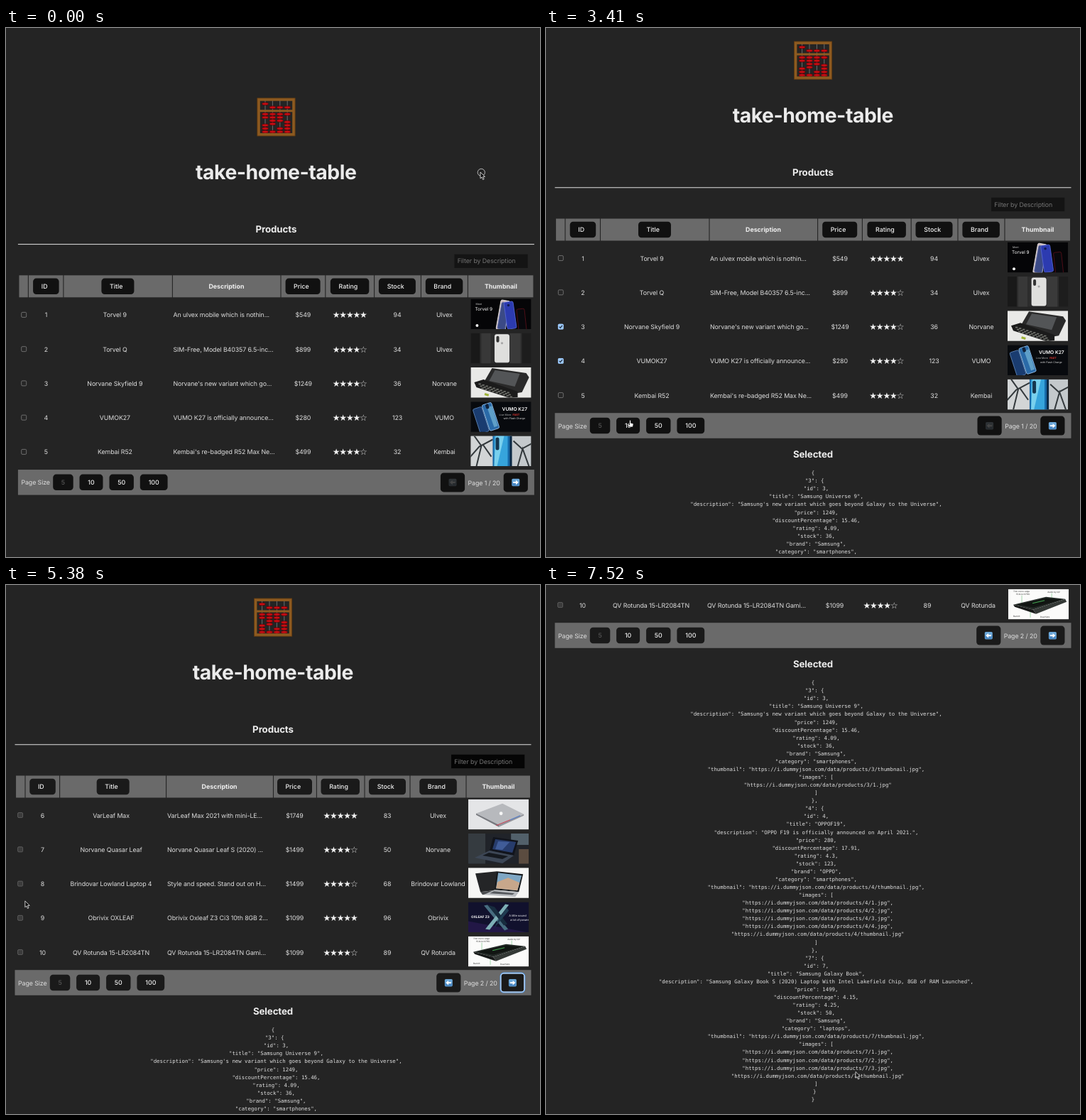
These frames come from a looping animation (752 px wide and 745 px high, 8 s). An HTML page:

```html
<!DOCTYPE html>
<html lang="en">
<head>
<meta charset="utf-8">
<title>take-home-table</title>
<style>
html, body { margin: 0; width: 100%; height: 100%; overflow: hidden; background: #242424; }
#stage { display: block; width: 752px; height: 745px; }
text {
  font: 400 8.85px Inter, "Open Sans", sans-serif;
  letter-spacing: -.1px; fill: #dedede; text-anchor: middle;
  text-rendering: geometricPrecision; white-space: pre;
}
.left { text-anchor: start; }
.h1 { font-size: 28.4px; font-weight: 700; letter-spacing: -.5px; fill: #ebebeb; }
.h2 { font-size: 13.3px; font-weight: 700; fill: #ececec; }
.th { font-weight: 700; letter-spacing: 0; fill: #f0f0f0; }
.btn text { font-weight: 500; letter-spacing: 0; fill: #f2f2f2; }
.btn .off { fill: #555; }
.hint { fill: #757575; }
.star { font: 12px "DejaVu Sans", sans-serif; letter-spacing: -1.15px; fill: #f2f2f2; }
.code { font: 7.37px "DejaVu Sans Mono", monospace; letter-spacing: 0; }
.btn rect.face { fill: #111; }
.second .btn rect.face { fill: #1a1a1a; }
.loading .btn { filter: brightness(.72); }
.box { fill: #262626; stroke: #808080; stroke-width: .8; }
.second .box { fill: #3b3b3b; stroke: #666; }
</style>
</head>
<body>
<svg id="stage" viewBox="0 0 752 745"></svg>
<script>
const LOOP = 8000;
const stage = document.getElementById('stage');
const $ = id => document.getElementById(id);
const show = (id, on) => { $(id).style.display = on ? '' : 'none'; };

const text = (x, y, s, cls = '') => `<text x="${x}" y="${y}" class="${cls}">${s}</text>`;
const rect = (x, y, w, h, fill, more = '') =>
  `<rect x="${x}" y="${y}" width="${w}" height="${h}" fill="${fill}" ${more}/>`;
const poly = (points, fill, more = '') => `<polygon points="${points}" fill="${fill}" ${more}/>`;
const line = (d, stroke, w = 1) => `<path d="${d}" fill="none" stroke="${stroke}" stroke-width="${w}"/>`;
const group = (id, body, cls = '') => `<g id="${id}" class="${cls}">${body}</g>`;
const label = (x, y, s, size, fill, weight = 400) =>
  `<text x="${x}" y="${y}" class="left" style="font-size:${size}px;font-weight:${weight};fill:${fill};letter-spacing:0">${s}</text>`;
const button = (x, y, w, h, s, dx = 0, cls = '') =>
  rect(x, y, w, h, '#111', 'rx="4.5" class="face"') + text(x + w / 2 + dx, y + h / 2 + 3.2, s, cls);

const rowY = i => 324.3 + i * 48.25;

// Product pictures, drawn in an 85 x 42.5 box
const phone = (x, y, w, h, angle, fill, edge) =>
  `<rect x="${x}" y="${y}" width="${w}" height="${h}" rx="2" fill="${fill}" stroke="${edge}" stroke-width=".8" transform="rotate(${angle} ${x + w / 2} ${y + h / 2})"/>`;
const dots = (cols, rows, at) => {
  let s = '';
  for (let r = 0; r < rows; r++) for (let c = 0; c < cols; c++) s += at(c, r);
  return s;
};
const pictures = [
  rect(0, 0, 85, 43, '#050507') + label(7, 8, 'Meet', 3.6, '#ccc') + label(6, 16.5, 'Torvel 9', 6.4, '#fff') +
    '<circle cx="9" cy="37.5" r="2" fill="#eee"/>' + phone(39, 2, 13, 42, 10, '#cdb9bd', '#eee') +
    phone(40.5, 5, 11, 38, 10, '#3b4a86', '#6a77b0') + phone(49, 4, 13, 38, -8, '#2c3bb0', '#5767d8') +
    '<circle cx="53" cy="9" r="1.8" fill="#111a50"/>' + phone(66, 14, 11, 32, -6, '#08080c', '#5c101a'),
  rect(0, 0, 85, 43, '#2c2c2c') + rect(0, 0, 13, 43, '#191919') + rect(15, 0, 13, 43, '#383838') +
    rect(55, 0, 15, 43, '#3a3a3a') + rect(72, 0, 13, 43, '#1d1d1d') +
    phone(34, 2, 20, 39, 0, '#dfdfdd', '#f4f4f4') + rect(36, 4, 4, 9, '#333', 'rx="2"') +
    '<circle cx="44" cy="14" r="1.6" fill="#a5a5a5"/>',
  rect(0, 0, 85, 43, '#e9e9e7') + poly('30,1 78,8 82,14 72,35 66,36 20,24 19,20', '#2a2a2a') +
    poly('34,4 69,9 62,27 26,19', '#535557') + poly('5,21 18,17 66,34 66,42 55,43 8,28', '#1b1b1b') +
    dots(9, 3, (c, r) => rect(11 + c * 5 + r * 2, 22.5 + c * 1.5 + r * 3, 3.3, 1.7, '#73756f')) +
    rect(20, 36, 6, 3, '#9fb338', 'transform="rotate(17 20 36)"'),
  rect(0, 0, 85, 43, '#080a0e') + phone(8, 8, 13, 36, -18, '#1a3c70', '#5f86b8') +
    phone(21, 2, 14, 38, -18, '#2a6aa8', '#9bc5ed') + poly('23,8 30,6 38,34 33,36', '#5f9fc8') +
    rect(20, 4, 4.5, 7, '#10213a', 'rx="2" transform="rotate(-18 20 4)"') +
    label(44, 13, 'VUMO K27', 6.7, '#fff', 600) + label(40, 20, 'Live More ', 3.6, '#bbb') +
    label(59, 20, 'FAST', 3.8, '#d8342f', 700) + label(46, 25, 'with Flash Charge', 3.6, '#ddd'),
  rect(0, 0, 85, 43, '#c4c9cc') + rect(0, 0, 30, 43, '#d2d5d6') +
    line('M-2 31L12 15 31 5M8 43L15 14 5 0M17 12L29 29M60 7L72 18 87 10M66 43L73 18 82 43', '#33393c', 2) +
    rect(31, 0, 26, 43, '#1668a7') + rect(33, 0, 19, 43, '#36a4dc') + poly('35,0 47,0 37,43 33,43', '#79d0ed') +
    rect(55, 0, 3, 43, '#0b2742') + rect(35, 2, 5, 18, '#15364f', 'rx="2.5"'),
  rect(0, 0, 85, 43, '#e4e5e7') + poly('11,20 48,6 78,21 43,36', '#b7b9bd') +
    poly('11,20 43,36 43,39 11,22', '#77797e') + poly('43,36 78,21 78,23 43,39', '#94969c') +
    line('M39 37L59 29', '#c5475a', 1) + line('M59 29L73 23', '#4f78c6', 1) + '<circle cx="46" cy="20" r="2.4" fill="#f5f5f5"/>',
  rect(0, 0, 85, 43, '#202329') + rect(0, 0, 24, 43, '#353b40') + rect(60, 0, 25, 16, '#52606a') +
    poly('35,5 70,10 64,31 30,24', '#11141c') + poly('38,8 67,12 62,27 34,22', '#273c6c') +
    poly('42,11 58,12 48,23 38,22', '#405c98') + poly('30,24 64,31 48,42 9,34', '#3d4756') +
    poly('29,27 56,32 48,36 20,31', '#15191f') + rect(71, 22, 14, 21, '#5b4c40'),
  rect(0, 0, 85, 43, '#f6f6f5') + poly('10,8 40,5 44,31 17,34', '#242527') + poly('17,34 44,31 47,34 20,38', '#4b4d50') +
    poly('40,5 77,9 71,34 37,31', '#16181a') + poly('42,7 75,11 69,32 39,29', '#7fa7c4') +
    poly('41,20 56,14 72,21 69,32 39,29', '#c7a78b') + poly('37,31 71,34 66,41 22,38', '#b9bcc0') +
    poly('36,33 65,36 62,38 30,36', '#55585d'),
  rect(0, 0, 85, 43, '#11112d') + poly('0,27 85,43 0,43', '#221746') + poly('22,5 27,4 56,38 51,40', '#476d80') +
    poly('52,3 57,4 30,39 24,38', '#7daeb5') + poly('27,4 37,7 55,31 50,33', '#172c3e') +
    poly('43,24 54,8 57,12 36,37', '#203c52') + label(4, 22, 'OXLEAF Z3', 4.7, '#fff', 700) +
    label(57, 21, 'A little sound', 4, '#fff') + label(59, 26, 'a lot of power', 4, '#fff'),
  rect(0, 0, 85, 43, '#fbfbfa') + label(7, 4, 'Thin micro edge', 3, '#333') + label(11, 8, '15.6 inch FHD', 3, '#333') +
    label(55, 5, 'Audio by QV', 3, '#333') + line('M19 9V19M61 6V13M31 29V40', '#6bc27b', .6) +
    poly('7,22 53,11 80,14 35,29', '#242a27') + poly('13,22 53,13 75,15 35,26', '#111512') +
    poly('35,29 80,14 82,18 39,35', '#343936') + poly('7,22 35,29 39,35 9,25', '#161817') +
    line('M34 20L51 16', '#43a652', 1.2) + label(45, 40, 'Dual fans', 3, '#333') + label(7, 39, 'Backlit', 3, '#333')
];

const pages = [
  {
    edges: [13.5, 27, 76.5, 230, 382.6, 445.4, 514.2, 580, 646, 738.6],
    heads: [['ID', 33.7, 36.5], ['Title', 130, 46], ['Price', 389.2, 49], ['Rating', 452.4, 54.5], ['Stock', 520.5, 52], ['Brand', 586.4, 52.5]],
    at: [20.7, 52, 149, 231, 414, 479.8, 546.6, 613, 650], about: 306, thumb: 692.5,
    rows: [
      [1, 'Torvel 9', 'An ulvex mobile which is nothin...', 549, 5, 94, 'Ulvex'],
      [2, 'Torvel Q', 'SIM-Free, Model B40357 6.5-inc...', 899, 4, 34, 'Ulvex'],
      [3, 'Norvane Skyfield 9', "Norvane's new variant which go...", 1249, 4, 36, 'Norvane'],
      [4, 'VUMOK27', 'VUMO K27 is officially announce...', 280, 4, 123, 'VUMO'],
      [5, 'Kembai R52', "Kembai's re-badged R52 Max Ne...", 499, 4, 32, 'Kembai']
    ]
  },
  {
    edges: [13.5, 27, 75.6, 225.6, 376.5, 437.4, 505, 569, 648, 738.6],
    heads: [['ID', 33.3, 36.5], ['Title', 127.7, 46], ['Price', 382, 49], ['Rating', 443.5, 54.5], ['Stock', 511, 52], ['Brand', 582.3, 52.5]],
    at: [20, 51.5, 148, 227, 406.5, 471, 537, 608.5, 651], about: 300.6, thumb: 693.4,
    rows: [
      [6, 'VarLeaf Max', 'VarLeaf Max 2021 with mini-LE...', 1749, 5, 83, 'Ulvex'],
      [7, 'Norvane Quasar Leaf', 'Norvane Quasar Leaf S (2020) ...', 1499, 4, 50, 'Norvane'],
      [8, 'Brindovar Lowland Laptop 4', 'Style and speed. Stand out on H...', 1499, 4, 68, 'Brindovar Lowland'],
      [9, 'Obrivix OXLEAF', 'Obrivix Oxleaf Z3 Ci3 10th 8GB 2...', 1099, 5, 96, 'Obrivix'],
      [10, 'QV Rotunda 15-LR2084TN', 'QV Rotunda 15-LR2084TN Gami...', 1099, 4, 89, 'QV Rotunda']
    ]
  }
];

function tableBody(p, n) {
  let s = '';
  p.edges.slice(0, -1).forEach((x, i) => { s += rect(x + .55, 268.5, p.edges[i + 1] - x - 1.1, 31, '#6a6a6a'); });
  s += text(p.about, 287.4, 'Description', 'th') + text(p.thumb, 287.4, 'Thumbnail', 'th');
  p.rows.forEach(([id, title, about, price, stars, stock, brand], i) => {
    const y = rowY(i), base = y + 3.2, [bx, ...c] = p.at;
    s += rect(bx - 3.4, y - 3.7, 7, 7, '', 'rx="1.4" class="box"');
    s += group('check' + id, rect(bx - 3.8, y - 4.1, 7.8, 7.8, '#9ccaff', 'rx="1.5"') +
      line(`M${bx - 2} ${y - .2}l1.5 1.7 2.8 -3.5`, '#1c2733', 1.2));
    s += text(c[0], base, id) + text(c[1], base, title) + text(c[2], base, about, 'left') + text(c[3], base, '$' + price);
    s += text(c[4] - .5, y + 4.2, '★'.repeat(stars) + '☆'.repeat(5 - stars), 'star');
    s += text(c[5], base, stock) + text(c[6], base, brand);
    s += `<svg x="${c[7]}" y="${y - 22.6}" width="85.2" height="42.6" viewBox="0 0 85 42.5">${pictures[n * 5 + i]}</svg>`;
  });
  return s;
}
const headButtons = p => p.heads.map(([s, x, w]) => button(x, 272.8, w, 22.4, s, -2.2)).join('');

function abacus() {
  let s = '';
  for (let c = 0; c < 4; c++) {
    const x = 360.6 + c * 10.4, gap = [2, 4, 3, 1][c];
    s += line(`M${x} 22V69`, '#777', .9);
    const beads = [c ? 32 : 27];
    for (let k = 0; k < 5; k++) beads.push(41.5 + k * 4.6 + (k >= gap ? 6.5 : 0));
    beads.forEach(y => {
      s += `<ellipse cx="${x}" cy="${y}" rx="4.5" ry="1.9" fill="#c90d13" stroke="#5a0608" stroke-width=".8"/>`;
    });
  }
  return s + line('M351 37H401', '#8d5a20', 3) +
    '<rect x="351.4" y="20.9" width="49.4" height="49.4" fill="none" stroke="#8d5a20" stroke-width="4"/>' +
    '<rect x="349.5" y="19" width="53.2" height="53.2" fill="none" stroke="#5b3710" stroke-width=".8"/>';
}

const arrowIcon = (x, dir) => `<g transform="translate(${x} 560.2) scale(${dir} 1)">` +
  rect(-5.5, -5.2, 11, 10.4, '#6ba7d8', 'rx="1.6"') + rect(-5, -.3, 10, 5, '#4b89c4', 'rx="1.4"') +
  poly('-3.6,-1 .2,-1 .2,-3.3 4,0 .2,3.3 .2,1 -3.6,1', '#fff') + '</g>';
const navButton = (x, dir, dim) => rect(x, 546.6, 34.2, 27, '#111', 'rx="4.5" class="face"') +
  `<g opacity="${dim ? .22 : 1}" ${dim ? 'style="filter:saturate(.3)"' : ''}>${arrowIcon(x + 17.1, dir)}</g>`;

// Selected items as JSON
const host = 'https://i.dummyjson.com/data/products/';
const item = (id, title, description, price, discountPercentage, rating, stock, brand, category, images) => ({
  id, title, description, price, discountPercentage, rating, stock, brand, category,
  thumbnail: `${host}${id}/thumbnail.jpg`,
  images: images.map(n => `${host}${id}/${n}.jpg`)
});
const items = {
  3: item(3, 'Samsung Universe 9', "Samsung's new variant which goes beyond Galaxy to the Universe", 1249, 15.46, 4.09, 36, 'Samsung', 'smartphones', [1]),
  4: item(4, 'OPPOF19', 'OPPO F19 is officially announced on April 2021.', 280, 17.91, 4.3, 123, 'OPPO', 'smartphones', [1, 2, 3, 4, 'thumbnail']),
  7: item(7, 'Samsung Galaxy Book', 'Samsung Galaxy Book S (2020) Laptop With Intel Lakefield Chip, 8GB of RAM Launched', 1499, 4.15, 4.25, 50, 'Samsung', 'laptops', [1, 2, 3, 'thumbnail'])
};
function jsonLines(ids) {
  const chosen = Object.fromEntries(ids.map(id => [id, items[id]]));
  return JSON.stringify(chosen, null, 1).split('\n').map((row, i) => {
    const body = row.trimStart();
    return text(376 + (row.length - body.length) * 2.22, 629.2 + i * 11.07, body, 'code');
  }).join('');
}

stage.innerHTML = group('page',
  abacus() + text(375.8, 132.8, 'take-home-table', 'h1') + text(376, 207.8, 'Products', 'h2') +
  rect(12.5, 224.2, 727, 1.1, '#d0d0d0') +
  `<rect id="field" x="627" y="238.8" width="103.3" height="19.4"/>` +
  text(631.3, 251.7, 'Filter by Description', 'left hint') +
  pages.map((p, n) => group('table' + n, tableBody(p, n))).join('') +
  rect(12.5, 542.2, 727, 35.6, '#6a6a6a') + text(17, 563.6, 'Page Size', 'left') +
  group('page1', text(668.8, 563.9, 'Page 1 / 20')) + group('page2', text(668.2, 563.9, 'Page 2 / 20')) +
  group('selected', text(376, 604.9, 'Selected', 'h2') + group('json', '')) +
  group('veil', rect(12.5, 230, 727, 1000, '#000', 'opacity=".5"') +
    '<text x="376" y="629.8" class="h2" style="fill:#a5a5a5">Loading...</text>') +
  group('buttons',
    pages.map((p, n) => group('heads' + n, headButtons(p))).join('') +
    button(61.8, 548.8, 28.5, 22.4, '5', 0, 'off') + button(99.1, 548.8, 33, 22.4, '10') +
    button(141.1, 548.8, 34.4, 22.4, '50') + button(184.4, 548.8, 38.8, 22.4, '100') +
    group('prevOff', navButton(607.5, -1, true)) + group('prevOn', navButton(606.2, -1)) + navButton(696.3, 1), 'btn') +
  group('focus', '<rect x="696.5" y="546.6" width="33.8" height="27" rx="4.5" fill="none" stroke="#5b9de8" stroke-width="2"/>' +
    '<rect x="696.9" y="547" width="33" height="26.2" rx="4.2" fill="none" stroke="#e8f1fb" stroke-width=".9"/>')
) + group('cursor',
  '<circle id="ring" cx="1.3" cy=".4" r="5.1" fill="none" stroke="#ddd" stroke-width=".8"/>' +
  '<path id="arrow" d="M0 0V8.8L2.1 7 3.6 10.5 5.2 9.8 3.7 6.4H6.5Z" fill="#111" stroke="#f0f0f0" stroke-width=".8"/>' +
  '<path id="hand" d="M-1 1Q0-.6 1 1V4.2L4 5Q4.8 5.3 4.5 7L3.6 10H-1.2L-4 6.5Q-4 5.2-2.6 5.6L-1 7Z" fill="#f4f4f4" stroke="#111" stroke-width=".7"/>');

// Pointer stops: time, x, y
const stops = [
  [0, 668, 203], [60, 668, 203], [840, 44, 639], [1590, 26, 548], [2000, 26, 548],
  [2820, 20, 418], [2940, 20, 418], [3410, 118.5, 552], [3760, 713, 559], [4430, 719.5, 555],
  [4650, 719.5, 555], [5380, 26.8, 445], [5480, 26.8, 445], [6040, 20, 369], [6220, 20, 369],
  [6950, 436, 685.5], [LOOP, 436, 685.5]
];
function pointerAt(t) {
  const i = stops.findIndex(s => s[0] > t);
  const [t0, x0, y0] = stops[i - 1], [t1, x1, y1] = stops[i];
  const k = (t - t0) / (t1 - t0), e = k * k * (3 - 2 * k);
  return [x0 + (x1 - x0) * e, y0 + (y1 - y0) * e];
}

const within = (t, a, b) => t >= a && t < b;
let shown = '';

function draw(t) {
  const picked = t >= 1640, loading = within(t, 4000, 4670), second = t >= 4670, turned = t >= 4000;
  const ids = [[3, 2940], [4, 1640], [7, 6060]].filter(([, at]) => t >= at).map(([id]) => id);
  const step = t < 7310 ? 0 : Math.min(4, Math.floor((t - 7310) / 70) + 1);
  const scroll = 489 * Math.sin(step * Math.PI / 8);

  $('page').setAttribute('transform', picked ? `translate(0 ${-scroll})` : 'translate(4.4 79.8)');
  stage.setAttribute('class', (second ? 'second ' : '') + (loading ? 'loading' : ''));
  $('field').setAttribute('fill', second ? '#050505' : '#141414');
  for (const n of [0, 1]) {
    show('table' + n, second === !!n);
    show('heads' + n, second === !!n);
  }
  for (let id = 1; id <= 10; id++) show('check' + id, ids.includes(id));
  show('page1', !turned);
  show('page2', turned);
  show('prevOff', !turned);
  show('prevOn', turned);
  show('selected', picked);
  show('veil', loading);
  show('focus', within(t, 4000, 6060));
  if (shown !== ids.join()) {
    shown = ids.join();
    $('json').innerHTML = ids.length ? jsonLines(ids) : '';
  }

  const [x, y] = pointerAt(t);
  const hand = within(t, 3370, 3560) || within(t, 3720, 4000);
  $('cursor').setAttribute('transform', `translate(${x} ${y})`);
  show('ring', t < 60);
  show('hand', hand);
  show('arrow', !hand);
}

const start = performance.now();
function tick() {
  draw((performance.now() - start) % LOOP);
  requestAnimationFrame(tick);
}
tick();
</script>
</body>
</html>
```
